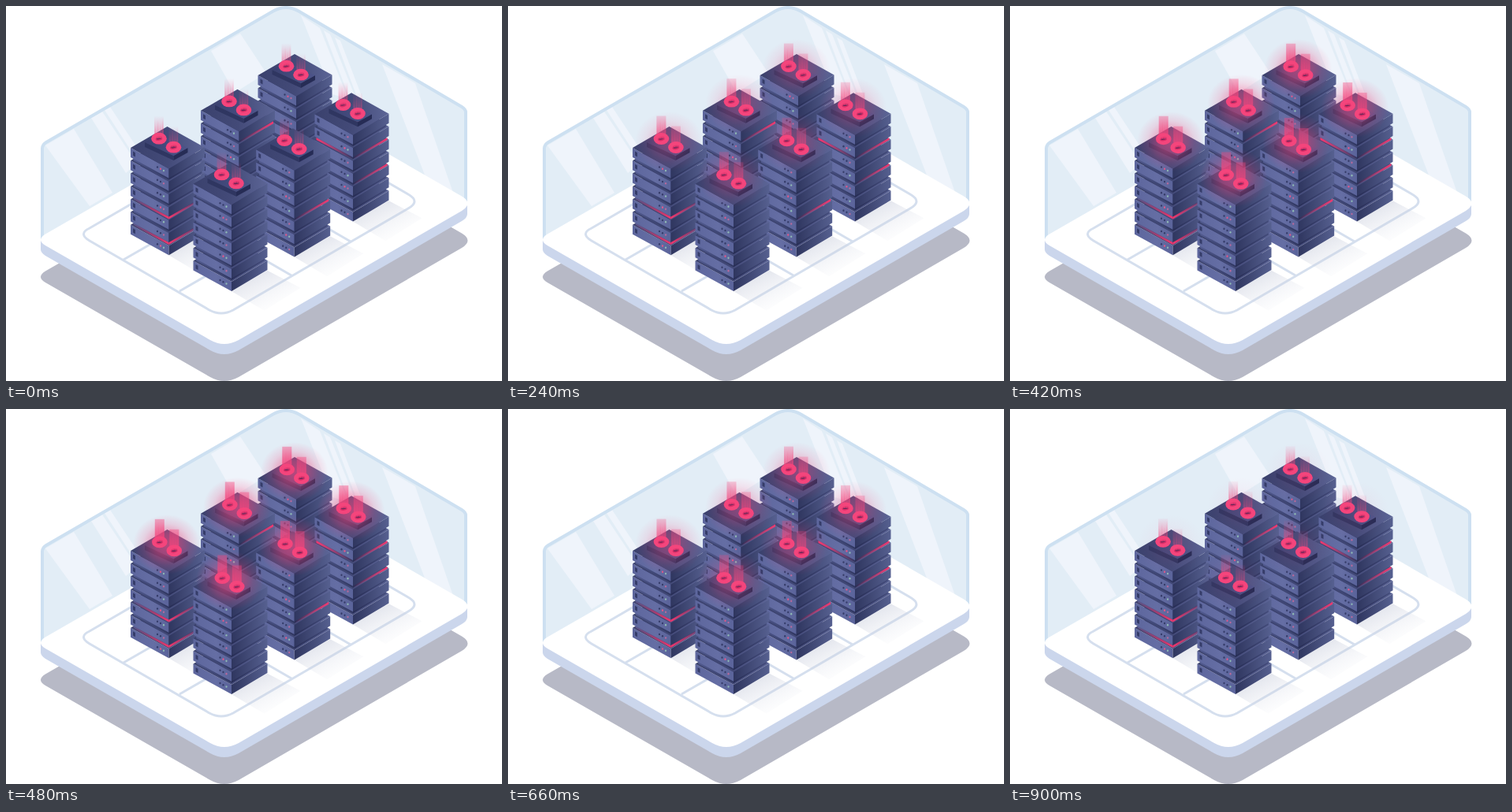
These frames come from a looping animation (629x476 px, 960 ms). An HTML page:

```html
<!DOCTYPE html>
<html lang="en">
<head>
<meta charset="utf-8">
<title>Server room</title>
<style>
  html, body { margin: 0; width: 100%; height: 100%; overflow: hidden; background: #fff; }
  svg { display: block; width: 629px; height: 476px; }
</style>
</head>
<body>
<svg id="stage" viewBox="0 0 629 476"></svg>
<script>
const stage = document.getElementById('stage');
const PINK = '#f4457c';
const UNITS = 7, UNIT_HEIGHT = 12, PITCH = 16.3;

const poly = (points, fill, extra = '') => `<polygon points="${points}" fill="${fill}" ${extra}/>`;
const path = (d, attrs) => `<path d="${d}" ${attrs}/>`;
const stop = ([offset, color, alpha = 1]) =>
  `<stop offset="${offset}" stop-color="${color}" stop-opacity="${alpha}"/>`;
const linear = (id, stops, attrs = '') =>
  `<linearGradient id="${id}" ${attrs}>${stops.map(stop).join('')}</linearGradient>`;

const defs = `<defs>
  ${linear('top', [[0, '#3a416d'], [.5, '#434a78'], [1, '#5c6596']])}
  ${linear('left', [[0, '#5d669d'], [.6, '#656ea4'], [1, '#5a639a']])}
  ${linear('right', [[0, '#2f365f'], [1, '#566090']])}
  ${linear('coreLeft', [[0, '#525b8f'], [1, '#2f3660']])}
  ${linear('coreRight', [[0, '#272d55'], [1, '#434b7a']])}
  ${linear('baseTop', [[0, '#3a4170'], [1, '#4d558a']])}
  ${linear('beam', [[0, PINK, 0], [1, PINK, .6]], 'x1="0" y1="0" x2="0" y2="1"')}
  ${linear('flare', [[0, PINK, .4], [1, PINK, .6]], 'x1="0" y1="0" x2="0" y2="1"')}
  ${linear('shade', [[0, '#b9bfd2', .42], [1, '#dfe3ee', 0]], 'x1="0.2" y1="0.2" x2="0.8" y2="0.9"')}
  ${linear('fadeIn', [[0, '#f0386f', 0], [1, '#f0386f']])}
  ${linear('fadeOut', [[0, '#f0386f'], [1, '#f0386f', 0]])}
  <radialGradient id="glow">
    ${[[0, PINK, .65], [.35, PINK, .5], [.7, PINK, .17], [1, PINK, 0]].map(stop).join('')}
  </radialGradient>
  <clipPath id="glassClip"><path d="M45 296V179L50 174 338 7Q355-3 372 7L579 130 583 134V250L356 114Z"/></clipPath>
</defs>`;

const slab = 'M50 289.5Q38 297 50 304L259 424Q276.5 434 295 424L578 260Q593 250.5 578 241.5L374 124Q356 113.5 338 124Z';

function room() {
  const rim = 'M46 296V181Q46 176 51 173L338 7Q355-3 372 7L578 128Q583 131 583 135V250';
  const stripes = [
    '50,177 86,156 135,237 106,254',
    '108,142 122,134 166,200 152,212',
    '125,132 132,128 165,178 160,186',
    '260,57 297,35 330,85 290,110',
    '374,12 398,28 434,118 414,112',
    '403,31 411,36 442,113 434,113',
    '417,40 424,44 454,122 446,118',
    '477,74 519,98 567,237 532,217'
  ];
  const track = 'M106 282Q91 289 106 298L258 386Q273 394 288 386L510 257Q526 248 510 239L360 152Q345 144 330 152Z';
  return path(slab, 'fill="#b7b9c6" transform="translate(0 47)"')
    + path(rim + 'L356 114Z', 'fill="#e2edf6"')
    + `<g clip-path="url(#glassClip)">${stripes.map(s => poly(s, '#eff4fb')).join('')}</g>`
    + path(rim, 'fill="none" stroke="#cde0f1" stroke-width="4"')
    + path('M44 297V309Q44 313 50 317L259 437Q276.5 447 295 437L578 273Q585 269 585 264V250Z', 'fill="#cbd6ec"')
    + path(slab, 'fill="#fff"')
    + path(track + 'M149 322L401 177M220 362L471 217M362 342L182 238M437 299L257 195',
      'fill="none" stroke="#d5dfee" stroke-width="3"');
}

// Iso box from its top outline: left, back, right, front corners
function box([l, b, r, f], height, top, left, right) {
  const down = ([x, y]) => [x, y + height];
  return poly([l, f, down(f), down(l)], left)
    + poly([f, r, down(r), down(f)], right)
    + poly([l, b, r, f], top);
}

const outline = (y, scale = 1) => [[0, 0], [46.5, -27], [94, -.5], [48.5, 26.5]]
  .map(([px, py]) => [47 + (px - 47) * scale, y + py * scale]);

function unit(i, seed) {
  const y = i * PITCH;
  const dark = '#353c69';
  const leds = [dark, (i + seed) % 3 ? dark : '#e0588a', (i + seed) % 2 ? '#8fb9b4' : '#b76a9c'];
  const dots = leds.map((color, n) => {
    const x = 34 + n * 4;
    return `<ellipse cx="${x}" cy="${y + 6 + x * .546}" rx="1.1" ry="1.3" fill="${color}"/>`;
  });
  return box(outline(y), UNIT_HEIGHT, 'url(#top)', 'url(#left)', 'url(#right)')
    + poly([[3, y + 4.5], [6, y + 6.2], [6, y + 11.5], [3, y + 9.8]], dark)
    + dots.join('');
}

// Seam: gap index, left fill, right fill
function seam([gap, left, right]) {
  const y = gap * PITCH + UNIT_HEIGHT + .5;
  const strip = (x1, y1, x2, y2, fill) => fill
    ? poly([[x1, y1], [x2, y2], [x2, y2 + 3], [x1, y1 + 3]], `url(#${fill})`) : '';
  return strip(2, y + 1, 48.5, y + 26, left) + strip(48.5, y + 26, 92, y + 1, right);
}

const rays = (x, y, height, fill, attrs) =>
  `<rect x="${x - 6}" y="${y - height}" width="12" height="${height}" fill="url(#${fill})" ${attrs}/>`;

function fan(x, y, height, strength) {
  let beams = rays(x, y, height, 'beam', `opacity="${strength}"`);
  for (let n = 0; n < 4; n++) {
    const h = 17 + (n * 7) % 12;
    beams += `<rect x="${x - 5 + n * 3}" y="${y - h}" width="1.3" height="${h}" fill="url(#beam)" opacity=".6"/>`;
  }
  return `<ellipse cx="${x}" cy="${y}" rx="9.8" ry="7.4" fill="${PINK}"/>
    <ellipse cx="${x}" cy="${y}" rx="4.6" ry="2.7" fill="#d92f68" transform="rotate(-12 ${x} ${y})"/>
    <ellipse cx="${x}" cy="${y}" rx="3.3" ry="1.1" fill="#6b2557" transform="rotate(-8 ${x} ${y})"/>
    ${beams}${rays(x, y - 4, height - 4, 'flare', 'class="glow"')}`;
}

function rack([x, y, seams], seed) {
  let out = poly('48,136 94,110 136,132 90,161', 'url(#shade)');
  for (let i = UNITS - 1; i >= 0; i--) {
    if (i < UNITS - 1) {
      out += box(outline(i * PITCH + UNIT_HEIGHT, .92), PITCH - UNIT_HEIGHT,
        '#333a68', 'url(#coreLeft)', 'url(#coreRight)');
    }
    out += unit(i, seed);
  }
  out += seams.map(seam).join('')
    + box([[18, -7], [36, -18], [72.5, 0], [54.5, 10]], 6, 'url(#baseTop)', '#2f3661', '#262c55')
    + '<ellipse class="glow" cx="46" cy="-8" rx="43" ry="38" fill="url(#glow)"/>'
    + `<g class="fans">${fan(36, -11.8, 29, .8)}${fan(54.5, -.8, 27, .5)}</g>`;
  return `<g transform="translate(${x} ${y})">${out}</g>`;
}

const racks = [
  [319.5, 88, []],
  [247, 132.7, [[0, '', 'fadeIn']]],
  [391.5, 137.3, [[1, 'fadeOut', 'fadeIn'], [3, '', 'fadeIn']]],
  [158, 180, [[3, 'fadeIn', 'fadeOut'], [5, 'fadeIn', 'fadeOut']]],
  [317.2, 182.3, [[3, '', 'fadeIn']]],
  [237.5, 225.7, []]
];

stage.innerHTML = defs + room() + racks.map(rack).join('');
const glows = stage.querySelectorAll('.glow');
const fans = stage.querySelectorAll('.fans');

function draw() {
  const step = Math.floor(performance.now() % 960 / 60);
  const level = 1 - Math.abs(step / 8 - 1);
  glows.forEach(g => g.setAttribute('opacity', level));
  fans.forEach(f => f.setAttribute('transform', `translate(${level * .8} ${level * .6})`));
  requestAnimationFrame(draw);
}
draw();
</script>
</body>
</html>
```
